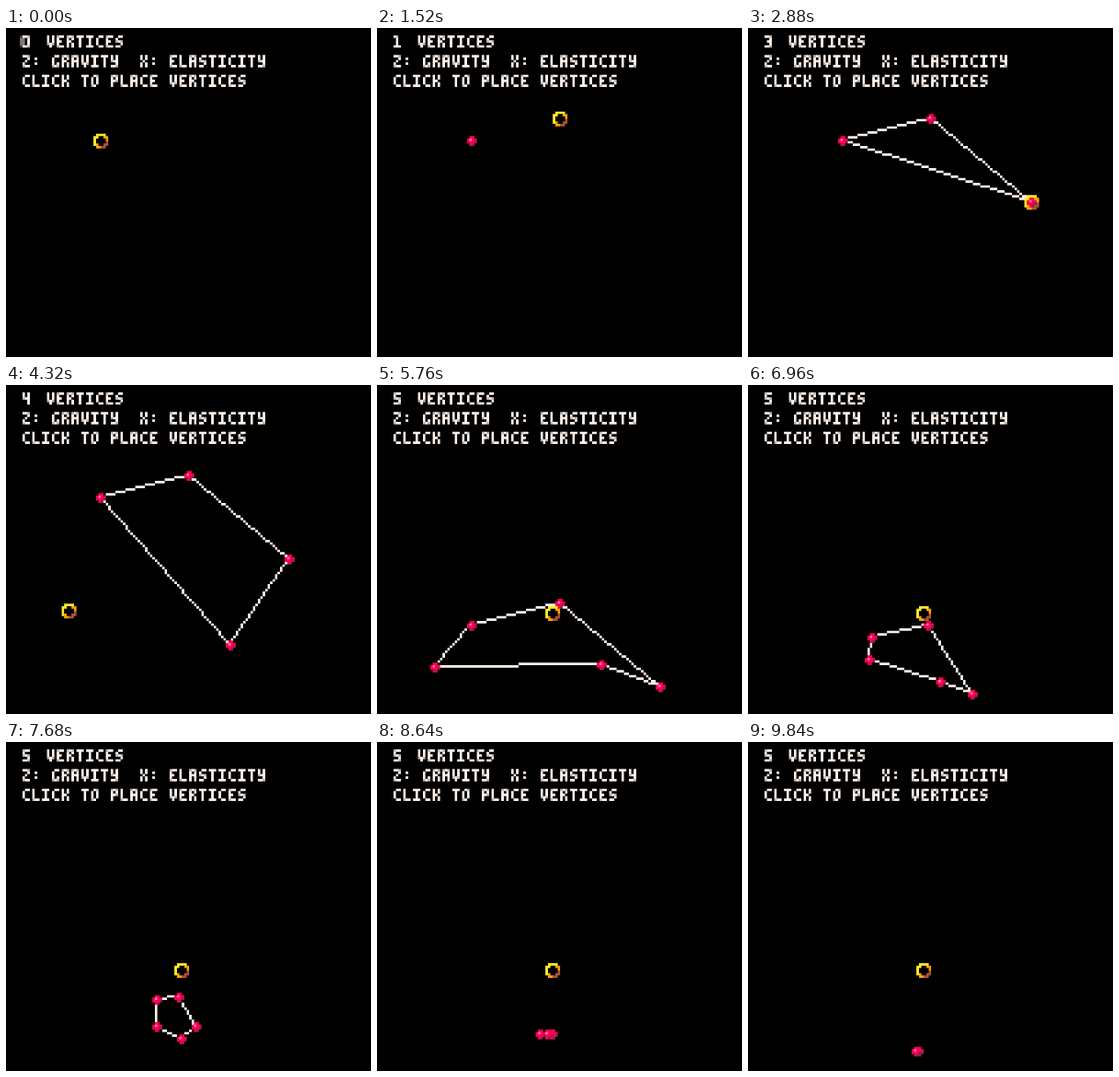
An HTML page with a canvas that plays this animation: 397x357 px, repeating every 9.92 s.

```html
<!DOCTYPE html>
<html lang="en">
<head>
<meta charset="utf-8">
<title>Vertices</title>
<style>
html, body { margin: 0; width: 100%; height: 100%; overflow: hidden; background: #000; }
canvas { position: absolute; left: 0; top: 0; }
pre { position: absolute; left: 17px; top: 4px; margin: 0; color: transparent;
  font: 17.7px/21.3px "Liberation Mono", monospace; }
</style>
</head>
<body>
<canvas id="stage" width="397" height="357"></canvas>
<pre id="label"></pre>
<script>
const LOOP = 9920, TICK = 80, SCALE = 8 / 3, LEFT = 1.9, ZOOM = 8;
const FLOOR = 126, HALF_G = 180, FALL = 5.224, SHRINK = 6.44, PULL = 0.97;
const WHITE = '#fff1e8', RED = '#ff004d', PINK = '#ff77a8', PLUM = '#7e2553';
const YELLOW = '#ffec27', ORANGE = '#ffa300', BROWN = '#ab5236';

// Strokes on a 3 x 5 grid
const glyphs = {
  0: 'M0 0H2V4H0Z', 1: 'M0 0H1V4M0 4H2', 2: 'M0 0H2V2H0V4H2', 3: 'M0 0H2V4H0M1 2H2',
  4: 'M0 0V2H2M2 0V4', 5: 'M2 0H0V2H2V4H0', ':': 'M1 1H1.01M1 3H1.01',
  A: 'M0 4V0H2V4M0 2H2', C: 'M1 0H2M0 1V3M1 4H2', E: 'M2 0H0V4H2M0 2H1',
  G: 'M1 0H2M0 1V4H2V3', I: 'M0 0H2M1 0V4M0 4H2', K: 'M0 0V4M0 2H1M2 0V1M2 3V4',
  L: 'M0 0V4H2', O: 'M1 0H2V3M0 1V4H1', P: 'M0 4V0H2V2H0', R: 'M0 4V0H2V1M0 2H1M2 3V4',
  S: 'M1 0H2M0 1V2H2V3M0 4H1', T: 'M0 0H2M1 0V4', V: 'M0 0V3H2V0M1 3V4',
  X: 'M0 0V1M2 0V1M1 2H1.01M0 3V4M2 3V4', Y: 'M0 0V2H2M2 0V4H0', Z: 'M0 0H2V1M1 2H1.01M0 3V4H2'
};
for (const c in glyphs) glyphs[c] = new Path2D(glyphs[c]);

// Start place, time of the click, and later floor hits in seconds of falling
const points = [
  { x: 38, y: 46, at: 640, hits: [1.853, 2.653] },
  { x: 74, y: 37, at: 1680, hits: [1.889, 2.676] },
  { x: 115, y: 71, at: 2640, hits: [1.44, 1.738, 2.534] },
  { x: 91, y: 106, at: 3440, hits: [0.86, 1.33, 1.808, 2.501] },
  { x: 23, y: 92, at: 4640, hits: [1.15, 1.871, 2.552] }
];
for (const p of points) {
  p.hits.unshift(Math.sqrt((FLOOR - p.y) / HALF_G));
  let beat = 2.58, lag = p.hits.at(-1) - beat;
  for (let hop = 0.56; hop > 0.03; hop *= 0.75) {
    beat += hop;
    lag *= 0.4;
    p.hits.push(beat + lag);
  }
}

const cursorKeys = [
  [0, 38, 46], [1080, 38, 46], [1520, 74, 37], [1760, 74, 37], [2240, 117, 71],
  [2400, 117, 71], [2480, 115, 71], [2900, 115, 71], [3200, 91, 106], [3700, 91, 106],
  [4320, 25, 92], [4560, 23, 92], [4720, 23, 92], [4960, 71, 93], [LOOP, 71, 93]
];

function makeCanvas(zoom) {
  const c = document.createElement('canvas');
  c.width = 149 * zoom;
  c.height = 134 * zoom;
  return c.getContext('2d');
}

const stage = document.getElementById('stage').getContext('2d');
const label = document.getElementById('label');
const g = makeCanvas(1), big = makeCanvas(ZOOM);
g.lineCap = 'square';
big.imageSmoothingEnabled = false;
stage.imageSmoothingQuality = 'high';

function dot(x, y, color) {
  g.fillStyle = color;
  g.fillRect(x, y, 1, 1);
}

function print(text, x, y) {
  g.strokeStyle = WHITE;
  [...text].forEach((c, i) => {
    if (!glyphs[c]) return;
    g.setTransform(1, 0, 0, 1, x + i * 4 + 0.5, y + 0.5);
    g.stroke(glyphs[c]);
  });
  g.resetTransform();
}

// Lines join the pixel up and left of each ball's centre
function line(a, b) {
  const dx = b.x - a.x, dy = b.y - a.y;
  const n = Math.max(Math.abs(dx), Math.abs(dy)) || 1;
  for (let i = 0; i <= n; i++) {
    dot(Math.round(a.x + dx * i / n) - 1, Math.round(a.y + dy * i / n) - 1, WHITE);
  }
}

function ball({ x, y }) {
  g.fillStyle = RED;
  g.fillRect(x - 1, y - 2, 2, 4);
  g.fillRect(x - 2, y - 1, 4, 2);
  dot(x - 1, y - 1, PINK);
  dot(x + 1, y, PLUM);
  dot(x, y + 1, PLUM);
}

function ring(x, y) {
  for (let j = 0; j < 6; j++) for (let i = 0; i < 6; i++) {
    const r = Math.hypot(i - 2.5, j - 2.5);
    if (r < 2 || r > 3) continue;
    const d = i + j;
    dot(x - 3 + i, y - 3 + j, d < 5 ? YELLOW : d < 8 ? ORANGE : BROWN);
  }
}

function cursorAt(t) {
  const i = cursorKeys.findIndex(k => k[0] > t);
  const [t0, x0, y0] = cursorKeys[i - 1], [t1, x1, y1] = cursorKeys[i];
  const u = (t - t0) / (t1 - t0), e = u * u * (3 - 2 * u);
  return [Math.round(x0 + (x1 - x0) * e), Math.round(y0 + (y1 - y0) * e)];
}

function heightAt(p, s) {
  if (s <= 0) return p.y;
  if (s < p.hits[0]) return p.y + HALF_G * s * s;
  const i = p.hits.findIndex(h => h > s);
  return i < 0 ? FLOOR : FLOOR - HALF_G * (s - p.hits[i - 1]) * (p.hits[i] - s);
}

// Every vertex drifts towards its two neighbours
function columnsAt(s) {
  let xs = points.map(p => p.x);
  for (let n = Math.round((s - SHRINK) * 60); n > 0; n--) {
    xs = xs.map((x, i) => x + (xs[(i + 4) % 5] + xs[(i + 1) % 5] - 2 * x) * PULL / 60);
  }
  return xs;
}

function draw(t) {
  const s = t / 1000, xs = columnsAt(s);
  const shape = points
    .map((p, i) => ({ x: Math.round(xs[i]), y: Math.round(heightAt(p, s - FALL)), at: p.at }))
    .filter(p => p.at <= t);
  const count = shape.length;

  g.fillStyle = '#000';
  g.fillRect(0, 0, g.canvas.width, g.canvas.height);
  print(String(count), 6, 3);
  print('VERTICES', 16, 3);
  print('Z: GRAVITY  X: ELASTICITY', 6, 11);
  print('CLICK TO PLACE VERTICES', 6, 19);
  const text = count + ' VERTICES\nZ: GRAVITY  X: ELASTICITY\nCLICK TO PLACE VERTICES';
  if (label.textContent !== text) label.textContent = text;

  if (count > 1) shape.forEach((p, i) => line(p, shape[(i + 1) % count]));
  shape.forEach(ball);
  ring(...cursorAt(t));

  // Enlarge with hard pixels, then reduce smoothly to the uneven scale
  big.drawImage(g.canvas, 0, 0, big.canvas.width, big.canvas.height);
  stage.fillStyle = '#000';
  stage.fillRect(0, 0, 397, 357);
  stage.drawImage(big.canvas, LEFT, 0, g.canvas.width * SCALE, g.canvas.height * SCALE);
}

const start = performance.now();
let shown = -1;
function tick() {
  const t = Math.floor((performance.now() - start) % LOOP / TICK) * TICK;
  if (t !== shown) draw(shown = t);
  requestAnimationFrame(tick);
}
tick();
</script>
</body>
</html>
```
